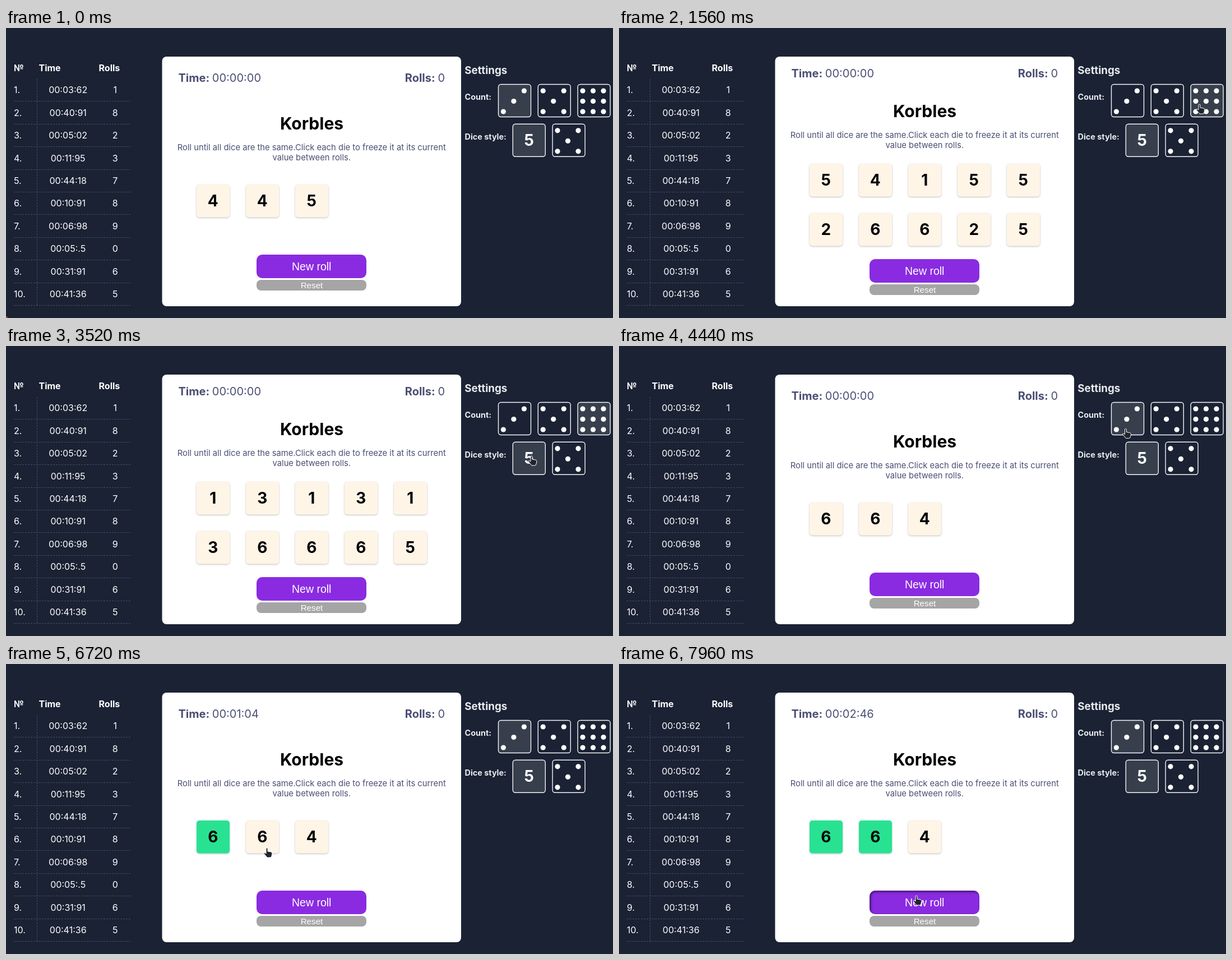
An HTML page that plays this animation: 1083 px wide and 517 px high, repeating every 8000 ms.

```html
<!DOCTYPE html>
<html lang="en">
<head>
<meta charset="utf-8">
<title>Dice game</title>
<style>
  html, body { margin: 0; width: 100%; height: 100%; overflow: hidden; background: #1a2234; }
  svg { display: block; width: 1083px; height: 517px; font-family: Inter, sans-serif; }
  .b { font-weight: 700; }
  .mid { text-anchor: middle; }
  .end { text-anchor: end; }
  .table { font-size: 16px; fill: #fff; }
  .grid { stroke: #435063; stroke-dasharray: 3 2; fill: none; }
  .stat { font-size: 20px; fill: #4a4e74; }
  .title { font-size: 30px; fill: #000; }
  .text { font-size: 14.75px; fill: #4a4e74; }
  .side { font-size: 14.4px; fill: #e9ebee; }
  .tile { fill: #fef5e7; filter: drop-shadow(0 1.5px 1.5px rgba(0, 0, 0, .25)); }
  .tile.held { fill: #28e292; }
  .num { font-size: 28px; }
  .option { stroke: #f4f5f7; stroke-width: 1.4; fill: #1a2234; }
  .option.on { fill: #373f4c; }
  .button { font-family: "Liberation Sans", Arial, sans-serif; fill: #fff; }
  .cursor { fill: #20242d; stroke: #fff; stroke-linejoin: round; }
</style>
</head>
<body>
<svg viewBox="0 0 1083 517">
  <defs>
    <clipPath id="face"><rect x="447" y="404" width="196" height="42" rx="10"/></clipPath>
    <filter id="soft" x="-10%" y="-40%" width="120%" height="180%"><feGaussianBlur stdDeviation="2.5"/></filter>
  </defs>
  <circle id="corner" cx="0" cy="517" r="3" fill="#b8413c"/>
  <g id="table" class="table"></g>
  <rect x="278.5" y="51" width="533.5" height="445" rx="8" fill="#fff"/>
  <g id="stats" class="stat">
    <text x="307.5" y="96"><tspan class="b">Time: </tspan><tspan id="clock"></tspan></text>
    <text class="end" x="783" y="96"><tspan class="b">Rolls: </tspan>0</text>
  </g>
  <g id="intro" class="mid">
    <text class="title b" x="545.5" y="180.5">Korbles</text>
    <text class="text" x="545.3" y="218">Roll until all dice are the same.Click each die to freeze it at its current</text>
    <text class="text" x="545.3" y="236">value between rolls.</text>
  </g>
  <g id="dice"></g>
  <g id="buttons" class="button mid">
    <rect x="447" y="404" width="196" height="42" rx="10" fill="#8a2be2"/>
    <g id="press" clip-path="url(#face)">
      <rect x="445" y="402" width="204" height="50" rx="12" fill="none" stroke="#000" stroke-opacity=".6" stroke-width="8" filter="url(#soft)"/>
    </g>
    <text x="545.2" y="432" font-size="19.5">New roll</text>
    <rect x="447" y="449" width="196" height="19" rx="8" fill="#a5a5a5"/>
    <text x="545.5" y="464" font-size="15.2">Reset</text>
  </g>
  <g class="side b">
    <text x="818.3" y="82" font-size="18.72">Settings</text>
    <text x="818.5" y="128">Count:</text>
    <text x="818.5" y="199">Dice style:</text>
  </g>
  <g id="options"></g>
  <path id="cursor" class="cursor"/>
</svg>
<script>
const LOOP = 8000, STEP = 40;
const $ = id => document.getElementById(id);
const HAND = 'M-2 10V1a1.6 1.6 0 0 1 3 0V6l6 1q2 1 2 3l-1 4q0 3-3 3H0l-6-7q0-3 4 0z';
const ARROW = 'M0 0V14.5l4-4 6-.5z';

const text = (x, y, s, cls = '') => `<text x="${x}" y="${y}" class="${cls}">${s}</text>`;
const inside = (p, x, y, w, h) => p.x >= x && p.x <= x + w && p.y >= y && p.y <= y + h;
const two = n => String(n).padStart(2, '0');

// Cells of a 3 by 3 grid: corners fill in pairs, the centre on odd faces
function hasPip(face, cell) {
  if (cell === 4) return face % 2;
  if (cell === 2 || cell === 6) return face > 1;
  if (cell % 2 === 0) return face > 3;
  return face > (cell === 3 || cell === 5 ? 5 : 7);
}

function pips(face, cx, cy, color) {
  let out = '';
  for (let k = 0; k < 9; k++) {
    if (!hasPip(face, k)) continue;
    out += `<circle cx="${cx + (k % 3 - 1) * 18.5}" cy="${cy + (Math.floor(k / 3) - 1) * 18.5}" r="4.6" fill="${color}"/>`;
  }
  return out;
}

// Score table
const scores = '03:62 1,40:91 8,05:02 2,11:95 3,44:18 7,10:91 8,06:98 9,05:.5 0,31:91 6,41:36 5';
$('table').innerHTML = text(14, 76.5, '№', 'b') + text(58.5, 76.5, 'Time', 'b') + text(165.5, 76.5, 'Rolls', 'b') +
  '<path class="grid" d="M55.5 91V494"/>' +
  scores.split(',').map((row, i) => {
    const [time, rolls] = row.split(' '), y = Math.round(116.2 + i * 40.44);
    return text(14, y, `${i + 1}.`) + text(110.7, y, `00:${time}`, 'mid') + text(194.7, y, rolls, 'mid') +
      `<path class="grid" d="M14 ${y + 14.5}H224"/>`;
  }).join('');

// Settings buttons in two rows
const option = (row, col, face) => ({ row, col, face, x: (row ? 904.3 : 878.5) + col * 70.8, y: 100.5 + row * 70.8 });
const options = [3, 5, 9].map((face, i) => option(0, i, face)).concat(option(1, 0, 0), option(1, 1, 5));

function drawOptions({ count, style }) {
  $('options').innerHTML = options.map(({ row, col, face, x, y }) => {
    const on = col === (row ? style : count);
    return `<rect class="option${on ? ' on' : ''}" x="${x}" y="${y}" width="58" height="58" rx="4.5"/>` +
      (face ? pips(face, x + 27.4, y + 30, '#fff') : `<text class="num b mid" fill="#fff" x="${x + 29}" y="${y + 39}">5</text>`);
  }).join('');
}

const isLong = scene => scene.dice.length > 5;
const diePos = (i, long) => [340 + i % 5 * 88, (long ? 242 : 279) + Math.floor(i / 5) * 88];

function drawDice(scene) {
  $('dice').innerHTML = [...scene.dice].map((v, i) => {
    const [x, y] = diePos(i, isLong(scene));
    return `<rect class="tile${i < scene.held ? ' held' : ''}" x="${x}" y="${y}" width="59" height="58.5" rx="5"/>` +
      (scene.style ? pips(v, x + 29.3, y + 29.3, '#000') : text(x + 29.3, y + 39, v, 'num b mid'));
  }).join('');
}

// Each click changes part of the state
const scenes = [{ at: 0, dice: '445', count: 0, style: 0, held: 0 }];
const click = (at, change) => scenes.push({ ...scenes[scenes.length - 1], at, ...change });
click(1560, { dice: '5415526625', count: 2 });
click(2440, { dice: '2413536265', style: 1 });
click(3520, { dice: '1313136665', style: 0 });
click(4440, { dice: '664', count: 0 });
click(5840, { held: 1 });
click(6920, { held: 2 });

// Pointer moves: each eases out to its stop, bend curves the path downwards
const entry = { x: 1071, y: 34 };
const moves = [];
const move = (from, to, x, y, bend = 0) => moves.push({ from, to, x, y, bend });
move(320, 1120, 999, 136);
move(1120, 1360, 1036, 136);
move(1600, 1920, 1009, 192);
move(2440, 3080, 938, 196);
move(3560, 4280, 904.5, 147.5);
move(4680, 5000, 529, 294);
move(5120, 5600, 369, 332, 9);
move(5880, 6640, 466, 328, 25);
move(7080, 7480, 531, 413);

function pointerAt(t) {
  const i = moves.filter(m => m.from <= t).length - 1;
  if (i < 0) return null;
  const a = moves[i - 1] || entry, b = moves[i];
  const p = Math.min(1, (t - b.from) / (b.to - b.from)), e = p * (2 - p);
  return { x: a.x + (b.x - a.x) * e, y: a.y + (b.y - a.y) * e + b.bend * 4 * e * (1 - e) };
}

function clickable(p, scene) {
  return options.some(o => inside(p, o.x, o.y, 58, 58)) ||
    [...scene.dice].some((_, i) => inside(p, ...diePos(i, isLong(scene)), 59, 59)) ||
    inside(p, 447, 404, 196, 64);
}

const show = (id, on) => { $(id).style.display = on ? '' : 'none'; };
const shift = (id, x, y) => $(id).setAttribute('transform', `translate(${x} ${y})`);
let current;

function setScene(scene) {
  const long = isLong(scene);
  drawOptions(scene);
  drawDice(scene);
  shift('stats', 0, long ? -8 : 0);
  shift('intro', 0, long ? -22 : 0);
  shift('buttons', 0, long ? 8 : 0);
  current = scene;
}

function render(t) {
  const scene = scenes.filter(s => s.at <= t).pop();
  if (scene !== current) setScene(scene);

  // The clock starts with the first held die
  const ticks = scene.held ? Math.round((t - 5812) * .1145) : 0;
  $('clock').textContent = `00:${two(Math.floor(ticks / 100))}:${two(ticks % 100)}`;
  show('press', t >= 7880);
  show('corner', t < 320);

  const p = pointerAt(t);
  show('cursor', p);
  if (p) {
    $('cursor').setAttribute('d', clickable(p, scene) ? HAND : ARROW);
    shift('cursor', p.x, p.y);
  }
}

const start = performance.now();
function frame() {
  const t = (performance.now() - start) % LOOP;
  render(Math.floor(t / STEP) * STEP);
  requestAnimationFrame(frame);
}
frame();
</script>
</body>
</html>
```
